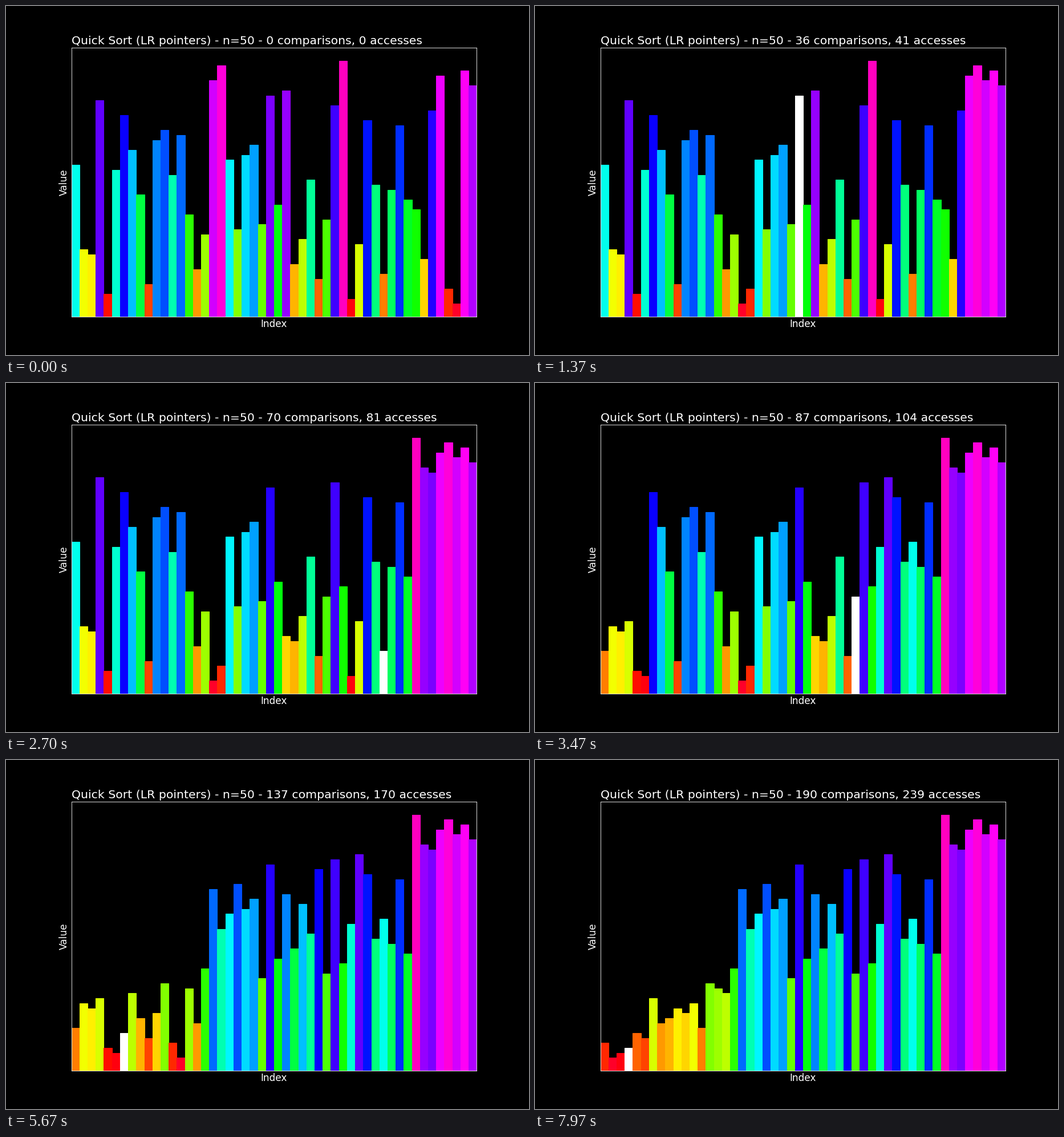
Recreate the animation shown at these times as a matplotlib script. Size 917 by 611 pixels, loop 8000 ms.

```python
from itertools import islice

import matplotlib.pyplot as plt
import numpy as np
from matplotlib.animation import FuncAnimation

WIDTH, HEIGHT, DPI = 917, 611, 64
PT = 76.4 / DPI  # type and lines are sized for a 12 x 8 inch page
N = 50
FRAMES, LOOP_MS = 240, 8000

plt.style.use("dark_background")
plt.rcParams.update({
    "font.family": "DejaVu Sans",
    "font.size": 16 * PT,
    "axes.linewidth": 0.8 * PT,
    "axes.titlepad": 6 * PT,
    "axes.labelpad": 4 * PT,
})


def swap(a, i, j):
    x = a[i]
    yield "get", i
    y = a[j]
    yield "get", j
    a[i] = y
    yield "set", i
    a[j] = x
    yield "set", j


def quick_sort(a, lo, hi):
    """Sort in place, yielding every array access as (kind, index)."""
    mid = (lo + hi) // 2
    pivot = a[mid]
    yield "get", mid
    i, j = lo, hi
    while i <= j:
        yield "get", i
        while a[i] < pivot:
            i += 1
            yield "get", i
        yield "get", j
        while a[j] > pivot:
            j -= 1
            yield "get", j
        if i <= j:
            yield from swap(a, i, j)
            i += 1
            j -= 1
    if lo < j:
        yield from quick_sort(a, lo, j)
    if i < hi:
        yield from quick_sort(a, i, hi)


def record(ranks, count):
    """One state per frame: ranks, highlighted index, comparisons so far."""
    states = [(ranks.copy(), None, 0)]
    reads = 0
    for kind, index in islice(quick_sort(ranks, 0, N - 1), count - 1):
        states.append((ranks.copy(), index, reads))
        reads += kind == "get"
    return states


states = record(np.random.RandomState(0).permutation(N), FRAMES)
heights = np.linspace(0.05, 1, N)
colors = plt.get_cmap("gist_rainbow")(np.linspace(0, 1, N))

fig, ax = plt.subplots(figsize=(WIDTH / DPI, HEIGHT / DPI), dpi=DPI)
fig.subplots_adjust(left=0.125, right=0.9, bottom=0.11, top=0.88)
bars = ax.bar(np.arange(N), heights, width=1, align="edge", linewidth=PT)
ax.set(xlim=(0, N), ylim=(0, 1.05), xticks=[], yticks=[],
       xlabel="Index", ylabel="Value")
title = ax.set_title("", loc="left")


def update(frame):
    ranks, active, comparisons = states[frame]
    for index, (bar, rank) in enumerate(zip(bars, ranks)):
        bar.set_height(heights[rank])
        bar.set_color("white" if index == active else colors[rank])
    title.set_text(f"Quick Sort (LR pointers) - n={N} - "
                   f"{comparisons} comparisons, {frame} accesses")
    return [*bars, title]


anim = FuncAnimation(fig, update, frames=FRAMES, interval=LOOP_MS / FRAMES,
                     repeat=True, repeat_delay=0, blit=False)
plt.show()
```
